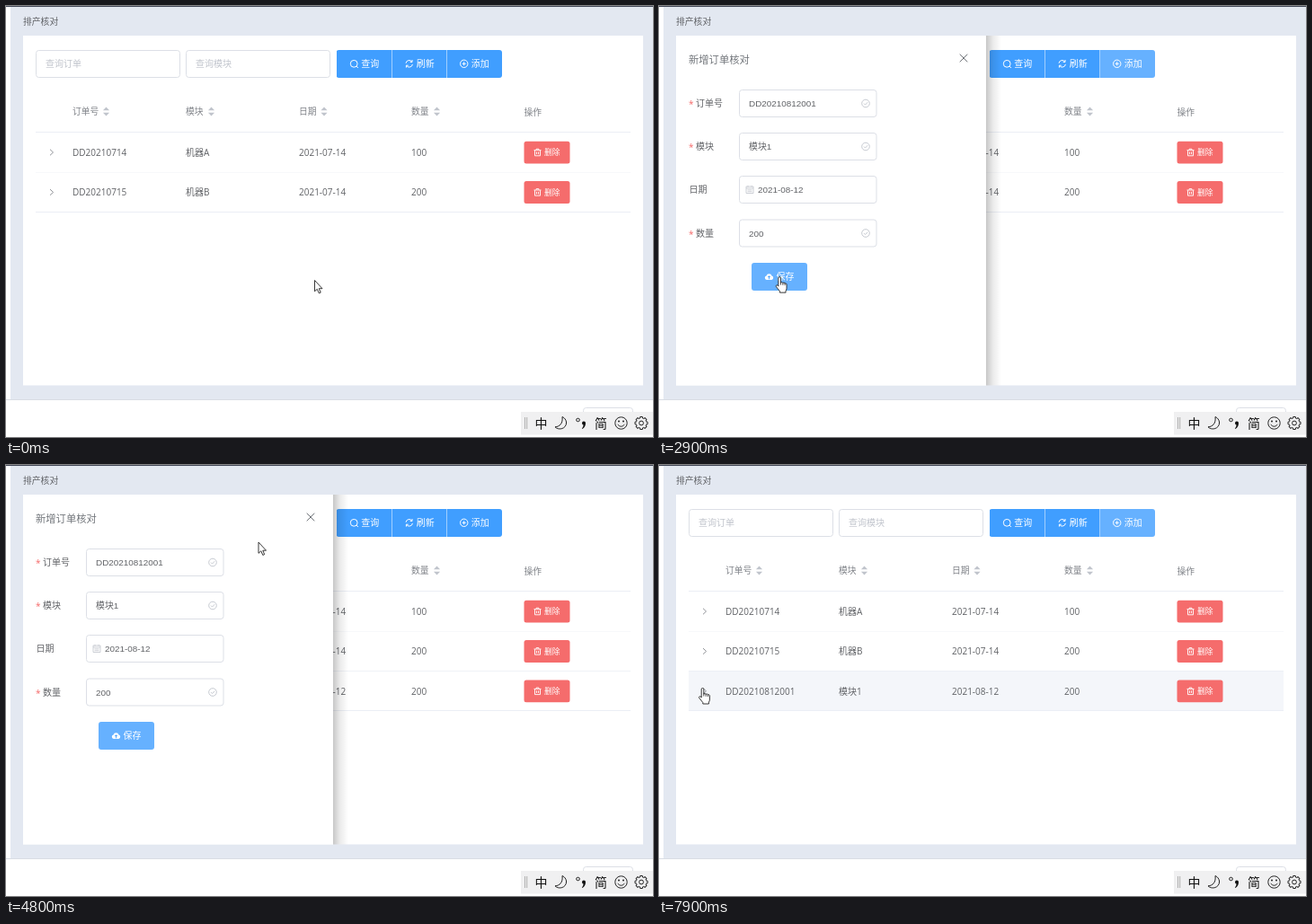
An HTML page that plays this animation: 720x480 px, repeating every 8 s.

```html
<!DOCTYPE html>
<html lang="zh-CN">
<head>
<meta charset="utf-8">
<title>排产核对</title>
<style>
html, body { margin: 0; width: 100%; height: 100%; overflow: hidden; background: #fff; }
svg { display: block; width: 720px; height: 480px; }
text { font: 10px "Open Sans", "Noto Sans CJK SC", "Noto Sans CJK", sans-serif; white-space: pre; }
.field { font-family: "Liberation Sans", "Noto Sans CJK SC", "Noto Sans CJK", sans-serif; }
</style>
</head>
<body>
<svg id="stage" viewBox="0 0 720 480" xmlns="http://www.w3.org/2000/svg"></svg>
<script>
const LOOP = 8000, STEP = 100, DRAWER_WIDTH = 345;
const BLUE = '#409eff', LIGHT_BLUE = '#66b1ff', RED = '#f56c6c';
const INK = '#606266', HEAD = '#7f8288', PALE = '#c0c4cc', BORDER = '#dcdfe6';

const text = (x, y, str, fill = INK, size = 10, attrs = '') =>
  `<text x="${x}" y="${y}" fill="${fill}" style="font-size:${size}px" ${attrs}>${str}</text>`;
const rect = (x, y, w, h, fill, attrs = '') =>
  `<rect x="${x}" y="${y}" width="${w}" height="${h}" fill="${fill}" ${attrs}/>`;
const line = (d, stroke, width = 1, attrs = '') =>
  `<path d="${d}" fill="none" stroke="${stroke}" stroke-width="${width}" ${attrs}/>`;
const at = (x, y, body, attrs = '') => `<g transform="translate(${x} ${y})" ${attrs}>${body}</g>`;
const box = (x, y, w) => rect(x + .5, y + .5, w - 1, 30, '#fff', `rx="3" stroke="${BORDER}"`);
const ring = (r, stroke, width = 1) =>
  `<circle r="${r}" fill="none" stroke="${stroke}" stroke-width="${width}"/>`;

const icons = {
  search: ring(3.9, '#fff') + line('M2.8 2.8L4.7 4.7', '#fff'),
  refresh: line('M-3.7 -.6A3.7 3.7 0 0 1 3 -2.2M3.7 .6A3.7 3.7 0 0 1 -3 2.2M3.3 -4.3V-1.9H1M-3.3 4.3V1.9H-1', '#fff'),
  plus: ring(4.2, '#fff') + line('M-2 0H2M0 -2V2', '#fff'),
  trash: line('M-4 -2.4H4M-1.4 -2.6V-3.8H1.4V-2.6M-3 -2.2V3.8H3V-2.2M-1 -.6V2.2M1 -.6V2.2', '#fff', .9),
  check: ring(4.3, PALE, .9) + line('M-2 0L-.5 1.6L2.2 -1.3', PALE, .9),
  calendar: line('M-4 -3.5H4V4H-4ZM-4 -1.5H4M-2.5 .4H2.5M-2.5 2.2H2.5M-2 -4.5V-3M2 -4.5V-3', PALE, .8),
  cloud: '<path d="M-2.7 3.7A2.3 2.3 0 0 1 -3 -.8A3.1 3.1 0 0 1 3 -.8A2.3 2.3 0 0 1 2.7 3.7Z" fill="#fff"/>' +
    line('M0 3V-.4M-1.5 .9L0 -.6L1.5 .9', BLUE, .9),
  sort: `<path d="M-3.6 -1.2L0 -5L3.6 -1.2ZM-3.6 1.2L0 5L3.6 1.2Z" fill="${PALE}"/>`,
  gear: [0, 45, 90, 135, 180, 225, 270, 315].map(a =>
    `<path d="M-1.7 -5L-1.3 -7H1.3L1.7 -5" transform="rotate(${a})" fill="none" stroke="#222"/>`).join('') + ring(2.4, '#222')
};

const bold = 'font-weight="500"';
const columns = [[74, '订单号', 111.5], [200, '模块', 228.5], [326, '日期', 354], [451, '数量', 479.5]];
const rows = [
  ['DD20210714', '机器A', '2021-07-14', '100'],
  ['DD20210715', '机器B', '2021-07-14', '200'],
  ['DD20210812001', '模块1', '2021-08-12', '200']
];
const rowTop = i => 141 + i * 44.4;

const tableRow = (cells, i) => {
  const mid = 163 + i * 44.4;
  return `<g id="row${i}">` +
    rect(33, rowTop(i), 662, 44, '#fff', `id="back${i}"`) +
    line(`M33 ${Math.floor(rowTop(i) + 44) + .5}H695`, '#ebeef5') +
    line(`M49 ${mid - 3.3}L52.5 ${mid}L49 ${mid + 3.3}`, '#85888e', .9) +
    cells.map((c, k) => text(columns[k][0], mid + 3.7, c)).join('') +
    rect(576.5, mid - 12.3, 51, 24.8, RED, 'rx="2.5"') +
    at(591.5, mid, icons.trash) + text(599, mid + 3.3, '删除', '#fff', 8.8, bold) + '</g>';
};

const formField = (label, value, y, required = true) =>
  (required ? text(33, y + 20, '*', RED) : '') +
  text(required ? 41 : 33.5, y + 19.3, label) + box(89, y, 153.5) +
  (required ? at(230, y + 15.5, icons.check) : at(101, y + 15.5, icons.calendar)) +
  text(required ? 100 : 110, y + 19.2, value, INK, 9.9, 'class="field"');

const groupButton = (x, w, icon, label, id) =>
  rect(x, 49, w, 31, BLUE, id ? `id="${id}"` : '') +
  at(x + 19.2, 64.3, icons[icon]) + text(x + 27.3, 68.2, label, '#fff', 10, bold);

const page =
  rect(0, 0, 720, 480, '#fff') + rect(5, 0, 715, 438, '#e3e8f1') + rect(0, 0, 720, 1, '#454a5a') +
  line('M0 438.5H720', '#d9dde4') + text(19, 20.6, '排产核对', INK, 9.8) + rect(19, 33, 690, 389.5, '#fff');

const main =
  box(33, 49, 161) + text(44, 68, '查询订单', PALE) + box(200, 49, 161) + text(211, 68, '查询模块', PALE) +
  `<g clip-path="url(#group)">${groupButton(368, 61.5, 'search', '查询')}${groupButton(429.5, 61, 'refresh', '刷新')}</g>` +
  line('M429.5 49V80', '#a0cfff') +
  columns.map(([x, name, sort]) => text(x, 121.2, name, HEAD, 9.8, bold) + at(sort, 117.5, icons.sort)).join('') +
  text(576.5, 121.8, '操作', HEAD, 9.8, bold) + line('M33 140.5H695', '#ebeef5') + rows.map(tableRow).join('');

const drawer =
  rect(364, 33, 17, 390, 'url(#shade)') + rect(19, 33, DRAWER_WIDTH, 390, '#fff') +
  text(33, 63.6, '新增订单核对', '#72767b', 11.3) +
  line('M334.7 53.7L343.3 62.3M343.3 53.7L334.7 62.3', '#72767b') +
  formField('订单号', 'DD20210812001', 93) + formField('模块', '模块1', 141) +
  formField('日期', '2021-08-12', 189, false) + formField('数量', '200', 237.5) +
  rect(103, 286, 62, 31, BLUE, 'id="save" rx="3"') + at(122.5, 301.3, icons.cloud) +
  text(130.5, 305.2, '保存', '#fff', 10, bold);

const inputBar =
  rect(642.5, 447.5, 55, 24, '#fff', `rx="3" stroke="${BORDER}"`) + rect(573, 452, 147, 25.5, '#f0f0f1') +
  line('M577.5 458V471M579.7 458V471', '#a8a8a8', .9) +
  text(588.5, 470, '中', '#111', 14) + text(655, 470, '简', '#111', 14) +
  line('M619 457.5C620 465 616 468.5 611 468.8C615 473 623.5 471 623.6 464C623.5 461 621.5 458.5 619 457.5Z', '#222') +
  at(636.5, 461, ring(1.8, '#222')) +
  '<path d="M641 464.5a2 2 0 1 1 4 0q0 4-3.5 6.5l-.6-.8q1.7-1.5 1.7-3.7q-1.6-.2-1.6-2z" fill="#111"/>' +
  at(684.5, 464.5, ring(6.7, '#222') + '<circle cx="-2.5" cy="-2" r="1" fill="#222"/><circle cx="2.5" cy="-2" r="1" fill="#222"/>' +
    line('M-3.8 1.6Q0 6 3.8 1.6', '#222')) +
  at(707, 464.5, icons.gear);

const pointers =
  '<g id="pointer"><path id="arrow" d="M0 0V12.3L2.8 9.8L4.8 14.4L6.7 13.6L4.8 9.2H8.5Z" fill="#fff" stroke="#222" stroke-width=".9"/>' +
  '<g id="hand" transform="translate(-4.5 0)"><path d="M3.2 11V1.8a1.3 1.3 0 0 1 2.6 0V7q1.2-1 2.4.2q1.2-.7 2.2.4q1.5-.3 2 1.2V13q0 2-1 3.2V18H4.8V16.5L.8 11.5q-.8-1.5.8-1.9q1 .1 1.6 1.4z" fill="#fff" stroke="#222" stroke-width=".9"/>' +
  line('M5.8 6.5V9.5M8.2 7.2V9.8M10.4 7.7V10', '#222', .8) + '</g></g>';

document.getElementById('stage').innerHTML =
  `<defs><linearGradient id="shade"><stop stop-color="#000" stop-opacity=".22"/><stop offset=".45" stop-color="#000" stop-opacity=".08"/><stop offset="1" stop-color="#000" stop-opacity="0"/></linearGradient>
  <clipPath id="card"><rect x="19" y="33" width="690" height="389.5"/></clipPath>
  <clipPath id="group"><rect x="367.5" y="49" width="184.5" height="31" rx="3"/></clipPath></defs>` +
  page + main + rect(19, 33, 690, 389.5, '#fff', 'id="mask"') +
  `<g clip-path="url(#group)">${groupButton(490.5, 61.5, 'plus', '添加', 'add')}${line('M490.5 49V80', '#a0cfff')}</g>` +
  `<g clip-path="url(#card)"><g id="drawer">${drawer}</g></g>` + inputBar + pointers;

const el = {};
document.querySelectorAll('[id]').forEach(node => el[node.id] = node);

const clamp = v => Math.min(1, Math.max(0, v));
// CSS "ease", solved for its curve parameter by bisection.
function ease(x) {
  if (x <= 0 || x >= 1) return clamp(x);
  let lo = 0, hi = 1, s;
  for (let i = 0; i < 20; i++) {
    s = (lo + hi) / 2;
    if (.75 * s * (1 - s) + s ** 3 < x) lo = s; else hi = s;
  }
  return .3 * s * (1 - s) ** 2 + 3 * s * s * (1 - s) + s ** 3;
}
const smooth = k => k * k * (3 - 2 * k);
const show = (node, on) => node.setAttribute('display', on ? 'inline' : 'none');

// time, x, y of the pointer's tip
const path = [
  [0, 343.5, 305.5], [850, 512.5, 58], [2000, 512.5, 58], [2700, 136, 303], [3000, 133.5, 300.5],
  [4300, 133.5, 300.5], [4800, 281, 86], [5300, 336.5, 60.5], [7000, 336.5, 60.5],
  [7500, 8, 286], [7800, 48.5, 248]
];
function pointerAt(t) {
  const next = path.findIndex(p => p[0] > t);
  if (next < 0) return path[path.length - 1].slice(1);
  const [a, b] = [path[next - 1], path[next]];
  const k = smooth((t - a[0]) / (b[0] - a[0]));
  return [a[1] + (b[1] - a[1]) * k, a[2] + (b[2] - a[2]) * k];
}

const between = (t, a, b) => t >= a && t < b;

function render(t) {
  const [x, y] = pointerAt(t);
  el.pointer.setAttribute('transform', `translate(${x} ${y})`);
  const hand = between(t, 2700, 4400) || between(t, 5300, 7100) || t >= 7700;
  show(el.hand, hand);
  show(el.arrow, !hand);

  const opening = (t - 1000) / 300, closing = (t - 6400) / 300;
  const shift = ease(closing) - ease(opening) + 1;
  el.drawer.setAttribute('transform', `translate(${-DRAWER_WIDTH * shift} 0)`);
  el.drawer.setAttribute('opacity', closing > 0 ? ease(1 - closing) : ease(opening));
  show(el.drawer, opening > 0 && closing < 1);

  el.mask.setAttribute('opacity', .9 * (ease((t - 3600) / 300) - ease((t - 4100) / 300)));
  show(el.row2, t >= 4100);
  rows.forEach((_, i) => {
    const over = (t < 1000 || t >= 6700) && between(x, 33, 695) && between(y + 1, rowTop(i), rowTop(i) + 44.4);
    el['back' + i].setAttribute('fill', over ? '#f4f6fa' : '#fff');
  });

  el.add.setAttribute('fill', between(t, 800, 3500) || t >= 6400 ? LIGHT_BLUE : BLUE);
  el.save.setAttribute('fill', t >= 2700 ? LIGHT_BLUE : BLUE);
}

const start = performance.now();
function tick() {
  const t = (performance.now() - start) % LOOP;
  render(Math.floor(t / STEP) * STEP);
  requestAnimationFrame(tick);
}
tick();
</script>
</body>
</html>
```
